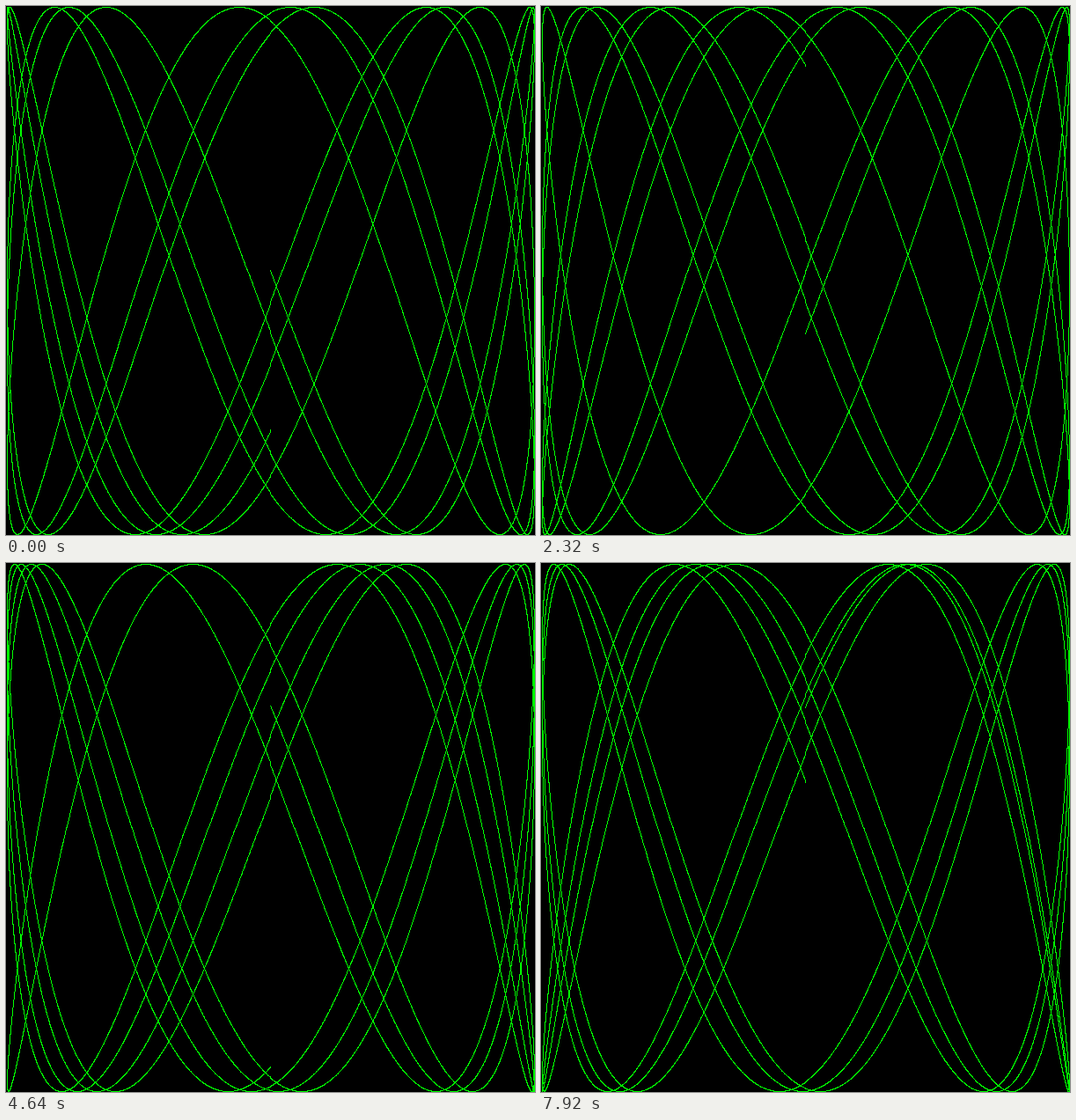
An HTML page with a canvas for the animation above (8 s loop, 601 px wide and 601 px high).

```html
<!DOCTYPE html>
<html lang="en">
<head>
<meta charset="utf-8">
<title>Lissajous</title>
<style>
  html, body { margin: 0; width: 100%; height: 100%; overflow: hidden; background: #000; }
  canvas { display: block; width: 601px; height: 601px; image-rendering: pixelated; }
</style>
</head>
<body>
<canvas id="stage" width="601" height="601"></canvas>
<script>
  const RADIUS = 300, SIDE = 2 * RADIUS + 1;
  const FREQ = 2.6794, CYCLES = 5, STEP = 0.001;
  const FRAME_MS = 80, FRAMES = 100, PHASE_STEP = 0.1;
  const BLACK = 0xff000000, GREEN = 0xff00ff00;

  const ctx = document.getElementById('stage').getContext('2d');
  const image = ctx.createImageData(SIDE, SIDE);
  const pixels = new Uint32Array(image.data.buffer);

  // Truncates toward zero, so the curve spans pixels 1 to 600.
  const toPixel = v => RADIUS + Math.trunc(v * RADIUS + 0.5);

  function draw(phase) {
    pixels.fill(BLACK);
    for (let i = 0; i * STEP < CYCLES * 2 * Math.PI; i++) {
      const t = i * STEP;
      const x = toPixel(Math.sin(t));
      const y = toPixel(Math.sin(t * FREQ + phase));
      pixels[y * SIDE + x] = GREEN;
    }
    ctx.putImageData(image, 0, 0);
  }

  let start, shown = 0;
  function tick(now) {
    start ??= now;
    const frame = Math.floor((now - start) / FRAME_MS) % FRAMES;
    if (frame !== shown) draw((shown = frame) * PHASE_STEP);
    requestAnimationFrame(tick);
  }
  draw(0);
  requestAnimationFrame(tick);
</script>
</body>
</html>
```
